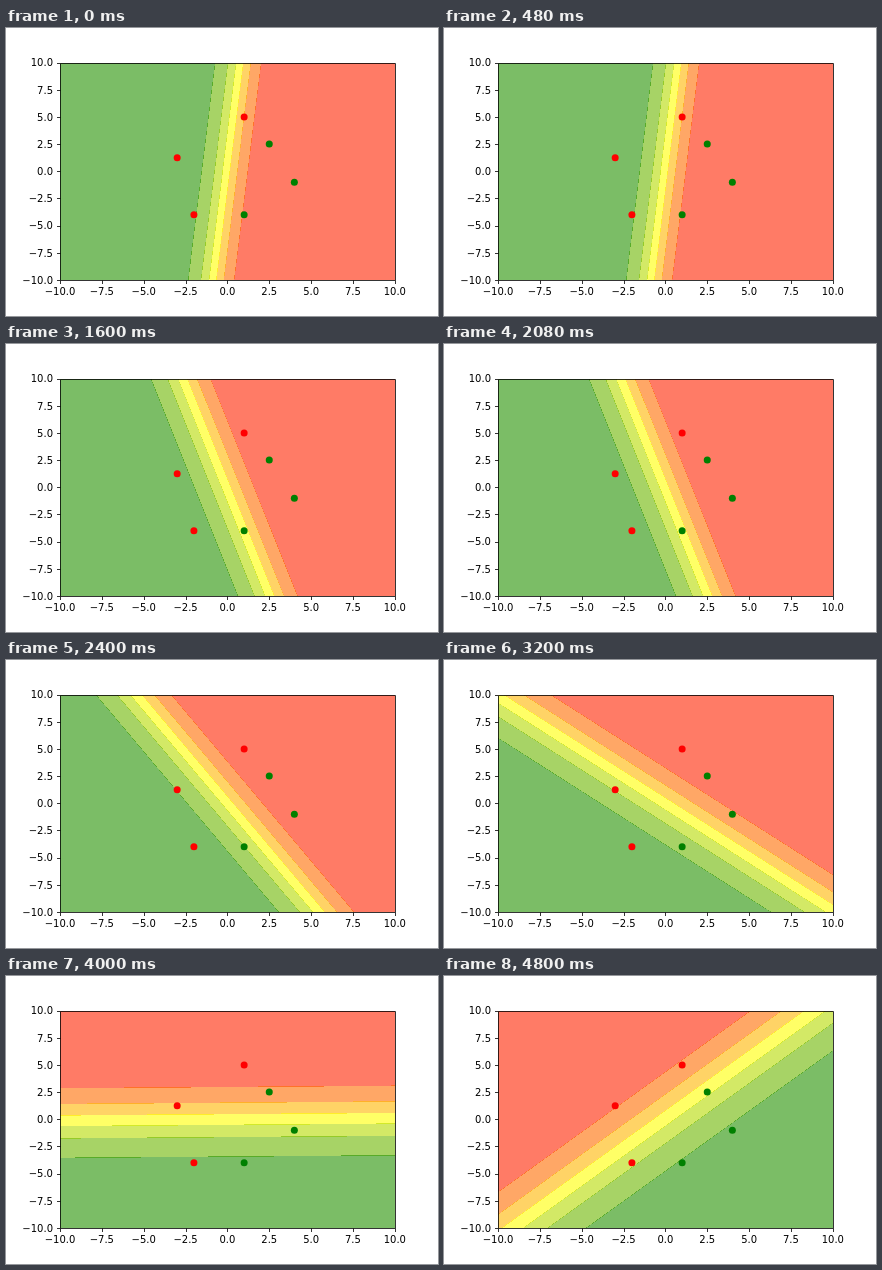
These frames come from a looping animation (432 by 288 pixels, 5.6 s). An HTML page:

```html
<!DOCTYPE html>
<html lang="en">
<head>
<meta charset="utf-8">
<title>Linear classifier training</title>
<style>
  html, body { margin: 0; width: 100%; height: 100%; overflow: hidden; background: #fff; }
  svg { display: block; }
  text { font: 10px "DejaVu Sans", sans-serif; }
  .axis { fill: none; stroke: #000; stroke-width: .8; }
</style>
</head>
<body>
<svg id="plot" width="432" height="288" viewBox="0 0 432 288">
  <clipPath id="area"><rect x="54" y="35" width="335" height="217"/></clipPath>
  <g clip-path="url(#area)"><g id="bands" fill-opacity=".6" shape-rendering="crispEdges"></g></g>
  <g id="dots"></g>
  <g id="axes"></g>
</svg>
<script>
const STEP = 800;
const CX = 221.4, CY = 143.28;   // data origin
const SX = 16.74, SY = 10.872;   // pixels per unit
const OVERLAP = 0.25;

// Sigmoid levels between the bands, and the band colours from low to high.
const cuts = [.15, .3, .45, .6, .75, .9].map(p => Math.log(p / (1 - p)));
const colors = ['#ff2400', '#ff6d00', '#ffb600', '#ffff00', '#b6db00', '#6db600', '#249200'];

// Weights and bias [w1, w2, b] after each training step.
const models = [
  [-1.432, .1155, 0],
  [-1.285, -.0643, 0],
  [-1.106, -.2875, .02],
  [-.875, -.478, .1],
  [-.547, -.557, .075],
  [.0071, -.614, .089],
  [.4776, -.4318, .142]
];

const points = [
  [-3, 1.25, 'red'], [-2, -4, 'red'], [1, 5, 'red'],
  [2.5, 2.5, 'green'], [4, -1, 'green'], [1, -4, 'green']
];

const $ = id => document.getElementById(id);
const px = x => CX + x * SX;
const py = y => CY - y * SY;
const snap = v => Math.floor(v + .5) + .5;

function add(parent, tag, attrs, text) {
  const el = document.createElementNS('http://www.w3.org/2000/svg', tag);
  for (const k in attrs) el.setAttribute(k, attrs[k]);
  if (text) el.textContent = text;
  return parent.appendChild(el);
}

function drawAxes() {
  const axes = $('axes');
  let d = 'M54.5 35.5H389.5V252.5H54.5Z';
  for (let v = -10; v <= 10; v += 2.5) {
    const x = px(v), y = py(v);
    const label = v.toFixed(1).replace('-', '\u2212');
    d += `M${snap(x)} 252.5v3.5M54.5 ${snap(y)}h-3.5`;
    add(axes, 'text', { x, y: 267, 'text-anchor': 'middle' }, label);
    add(axes, 'text', { x: 47, y: Math.round(y + 3.8), 'text-anchor': 'end' }, label);
  }
  add(axes, 'path', { class: 'axis', d });
}

// Bands are strips along the gradient direction, centred on the data origin.
function showModel([w1, w2, b]) {
  const gx = w1 / SX, gy = -w2 / SY;
  const slope = Math.hypot(gx, gy);
  const angle = Math.atan2(gy, gx) * 180 / Math.PI;
  const edges = [-500, ...cuts.map(z => (z - b) / slope), 500];
  $('bands').setAttribute('transform', `translate(${CX} ${CY}) rotate(${angle})`);
  strips.forEach((r, i) => {
    r.setAttribute('x', edges[i] - OVERLAP);
    r.setAttribute('width', edges[i + 1] - edges[i] + 2 * OVERLAP);
  });
}

const strips = colors.map(fill => add($('bands'), 'rect', { y: -500, height: 1000, fill }));
for (const [x, y, fill] of points) add($('dots'), 'circle', { cx: px(x), cy: py(y), r: 3.5, fill });
drawAxes();

const start = performance.now();
let shown = -1;
function tick() {
  const step = Math.floor((performance.now() - start) / STEP) % models.length;
  if (step !== shown) showModel(models[shown = step]);
  requestAnimationFrame(tick);
}
tick();
</script>
</body>
</html>
```
